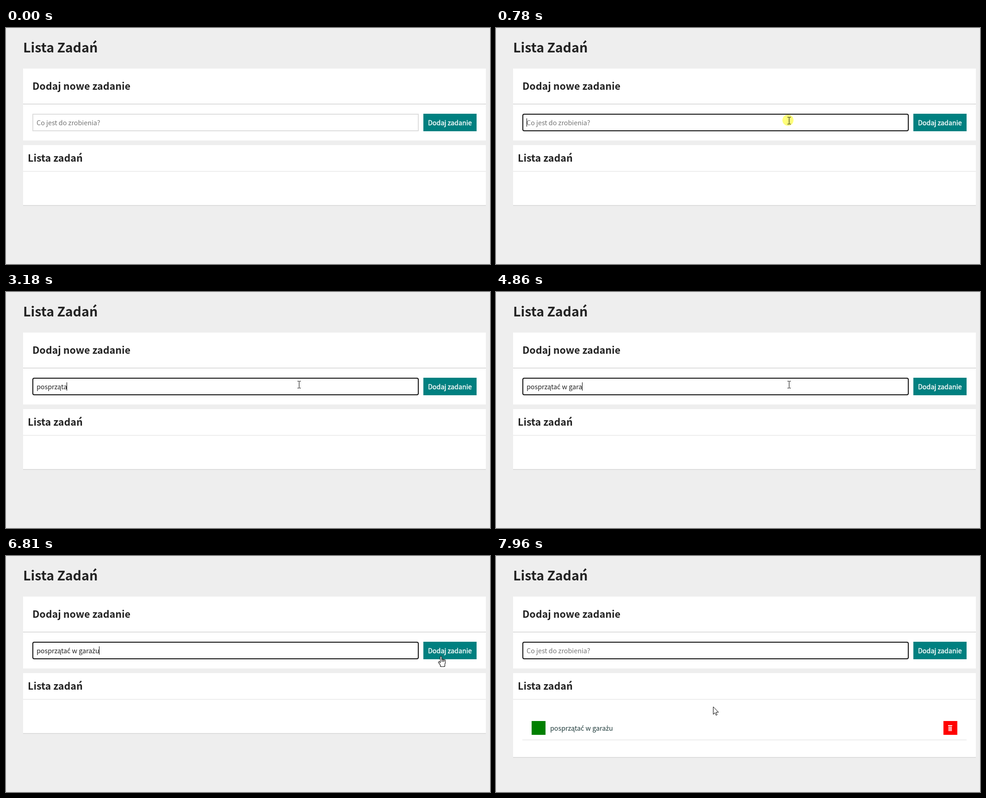
Recreate the animation shown at these times as an HTML page with a canvas. Size 1046x512 px, loop 7990 ms.

```html
<!DOCTYPE html>
<html lang="pl">
<head>
<meta charset="utf-8">
<title>Lista Zadań</title>
<style>
html, body { margin: 0; width: 100%; height: 100%; overflow: hidden; background: #eee; }
canvas { display: block; }
</style>
</head>
<body>
<canvas id="stage" width="1046" height="512"></canvas>
<script>
const ctx = document.getElementById('stage').getContext('2d');
const LOOP = 7990;
const FAMILY = '"Noto Sans CJK JP", "Noto Sans CJK SC", "Noto Sans CJK", "Noto Sans", sans-serif';
const EM = 1 / 1.117; // the Latin letters of this family are drawn large
const INK = '#222';
const TASK = 'posprzątać w garażu';
const PLAIN = { 'ą': 'a', 'ć': 'c', 'ż': 'z' };
const FOCUS = 780, TYPING = 1590, BLUR = 7210, ADDED = 7410;

const easeOut = u => 1 - (1 - u) ** 2;
const easeInOut = u => u * u * (3 - 2 * u);
const part = (t, start, end) => Math.min(1, Math.max(0, (t - start) / (end - start)));
const mix = (a, b, u) => a + (b - a) * u;

// Typing runs at a steady pace in each of four bursts
function typedCount(t) {
  if (t < TYPING) return 0;
  return Math.floor(1.001 + 8 * part(t, TYPING, 3180) + 4 * part(t, 3180, 3870)
    + 4 * part(t, 3870, 4860) + 2 * part(t, 4860, 5380));
}

function rect(x, y, w, h, color) {
  ctx.fillStyle = color;
  ctx.fillRect(x, y, w, h);
}

function text(str, x, y, size, weight, color) {
  ctx.font = `${weight} ${size * EM}px ${FAMILY}`;
  ctx.fillStyle = color;
  ctx.fillText(str, x, y);
}

const plain = str => str.replace(/[ąćż]/g, c => PLAIN[c]);
const widthOf = str => ctx.measureText(plain(str)).width;

// Body text whose Polish marks are added over the base letters
function taskText(str, x, y, color) {
  text(plain(str), x, y, 16, 400, color);
  ctx.strokeStyle = color;
  ctx.lineWidth = 1.1;
  [...str].forEach((c, i) => {
    if (!PLAIN[c]) return;
    const left = x + widthOf(str.slice(0, i));
    const mid = left + widthOf(c) / 2;
    ctx.beginPath();
    if (c === 'ą') {
      ctx.moveTo(left + 6.8, y - 0.2);
      ctx.quadraticCurveTo(left + 4.8, y + 3.2, left + 7.4, y + 2.7);
      ctx.stroke();
    } else if (c === 'ć') {
      ctx.moveTo(mid, y - 9.2);
      ctx.lineTo(mid + 1.9, y - 11.4);
      ctx.stroke();
    } else {
      ctx.arc(mid, y - 10.3, 0.95, 0, 7);
      ctx.fill();
    }
  });
}

// In from below, a dip from the field to the button, then off to the list
function pointerAt(t) {
  if (t < 6440) {
    const u = easeInOut(part(t, 130, 750));
    return [mix(822, 631, u), mix(485, 200, u)];
  }
  if (t < 6810) {
    const u = easeInOut(part(t, 6440, 6810));
    return [mix(631, 938, u), mix(200, 217, u) + 240 * u * (1 - u)];
  }
  const settle = easeOut(part(t, 6810, 7190)), leave = part(t, 7870, 7960);
  return [mix(mix(938, 951, settle), 469, leave), mix(mix(217, 206, settle), 327, leave)];
}

function arrow(x, y) {
  ctx.beginPath();
  ctx.moveTo(x + 0.5, y + 0.5);
  ctx.lineTo(x + 0.5, y + 16.5);
  ctx.lineTo(x + 4, y + 13);
  ctx.lineTo(x + 6.5, y + 18.5);
  ctx.lineTo(x + 9, y + 17.5);
  ctx.lineTo(x + 6.5, y + 12);
  ctx.lineTo(x + 11.5, y + 12);
  ctx.closePath();
  ctx.fillStyle = '#fff';
  ctx.strokeStyle = '#000';
  ctx.lineWidth = 1;
  ctx.fill();
  ctx.stroke();
}

function beam(x, y) {
  rect(x + 2, y - 6, 1, 14, '#000');
  for (const top of [y - 7, y + 8]) {
    rect(x - 1, top, 3, 1, '#000');
    rect(x + 3, top, 3, 1, '#000');
  }
}

// Four fingers, a slanted thumb and a palm, black first, then white inside
function hand(x, y) {
  ctx.lineJoin = ctx.lineCap = 'round';
  for (const [color, grow] of [['#000', 1], ['#fff', 0]]) {
    ctx.strokeStyle = ctx.fillStyle = color;
    ctx.lineWidth = 2 + 2 * grow;
    ctx.beginPath();
    for (let i = 0; i < 4; i++) {
      ctx.moveTo(x + 2 + i * 2.7, y + (i ? 7.5 + i * 0.7 : 2));
      ctx.lineTo(x + 2 + i * 2.7, y + 15);
    }
    ctx.moveTo(x - 2, y + 13.5);
    ctx.lineTo(x + 2.5, y + 19.5);
    ctx.stroke();
    ctx.beginPath();
    ctx.roundRect(x + 1 - grow, y + 13 - grow, 9 + 2 * grow, 9.5 + 2 * grow, 2);
    ctx.fill();
  }
  for (let i = 0; i < 3; i++) rect(x + 3 + i * 2.7, y + 8, 0.8, 4, '#000');
}

function pointer(t) {
  if (t < 130) return;
  const [x, y] = pointerAt(t).map(Math.round);
  if ((t >= FOCUS && t < 940) || (t >= BLUR && t < ADDED)) {
    ctx.fillStyle = 'rgba(255,255,0,.52)';
    ctx.beginPath();
    ctx.arc(x, y, 12, 0, 7);
    ctx.fill();
  }
  const inRow = y >= 186 && y < 224;
  if (inRow && x >= 57 && x < 892) beam(x, y);
  else if (inRow && x >= 902 && x < 1017) hand(x, y);
  else arrow(x, y);
}

// Blinks every half second, restarted by focus, the last key and the new item
function caretOn(t) {
  if (t >= TYPING && t < 5380) return true;
  const restart = t < TYPING ? FOCUS : t < ADDED ? 5380 : ADDED;
  return Math.floor((t - restart) / 515) % 2 === 0;
}

function field(t) {
  const focused = (t >= FOCUS && t < BLUR) || t >= ADDED;
  ctx.lineWidth = 2;
  ctx.strokeStyle = focused ? '#101010' : '#ddd';
  ctx.beginPath();
  ctx.roundRect(58, 187, 833, 36, focused ? 3 : 0);
  ctx.stroke();

  const typed = t < ADDED ? TASK.slice(0, typedCount(t)) : '';
  if (typed) taskText(typed, 66, 211, INK);
  else text('Co jest do zrobienia?', 66, 211, 16, 400, '#757575');
  if (focused && caretOn(t)) rect(Math.floor(66 + widthOf(typed)), 196, 1, 18, '#000');

  rect(902, 186, 115, 38, '#008080');
  text('Dodaj zadanie', 912, 211, 16, 500, '#fff');
  ctx.strokeStyle = '#fff';
  ctx.lineWidth = 0.4;
  ctx.strokeText('Dodaj zadanie', 912, 211);
}

function item() {
  rect(77, 358, 30, 30, '#008000');
  taskText(TASK, 117, 379, '#203c3c');
  rect(967, 358, 30, 30, '#f00');
  rect(977, 367, 9, 2, '#fff');
  rect(978, 370, 7, 10, 'rgba(255,255,255,.45)');
  for (let x = 978; x < 986; x += 3) rect(x, 370, 1, 10, '#fff');
  rect(57, 398, 960, 2, '#eee');
}

function draw(t) {
  rect(0, 0, 1046, 512, '#eee');
  text('Lista Zadań', 37, 53, 32, 700, INK);

  rect(37, 88, 1000, 156, '#fff');
  text('Dodaj nowe zadanie', 57, 134, 24, 700, INK);
  rect(37, 164, 1000, 2, '#ddd');
  field(t);

  const bottom = t < ADDED ? 384 : 436;
  rect(37, 254, 1000, bottom - 254, '#fff');
  text('Lista zadań', 47, 290, 24, 700, INK);
  rect(37, 310, 1000, 2, '#eee');
  rect(37, bottom, 1000, 2, '#ddd');
  if (t >= ADDED) item();

  pointer(t);
}

const began = performance.now();
function tick() {
  draw((performance.now() - began) % LOOP);
  requestAnimationFrame(tick);
}
tick();
</script>
</body>
</html>
```
